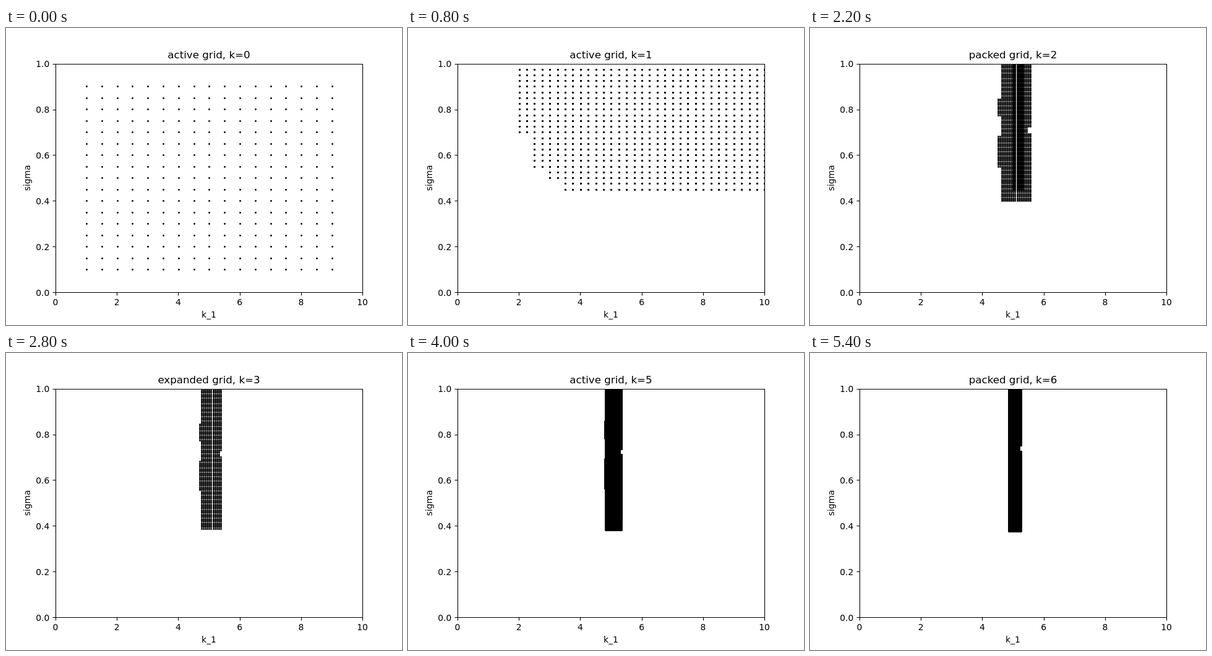
Write an HTML page with a canvas that moves like this. It is 640 px wide and 480 px high and loops after 5600 ms.

```html
<!DOCTYPE html>
<html lang="en">
<head>
<meta charset="utf-8">
<title>Grid refinement</title>
<style>
  html, body { margin: 0; width: 100%; height: 100%; overflow: hidden; background: #fff; }
  canvas, svg { position: absolute; left: 0; top: 0; display: block; }
  text { font: 13.89px "DejaVu Sans", sans-serif; fill: #000; }
  .mid { text-anchor: middle; }
  .end { text-anchor: end; }
  #title { font-size: 16.67px; }
  path { stroke: #000; stroke-width: 1.1; fill: none; }
</style>
</head>
<body>
<canvas id="dots" width="640" height="480"></canvas>
<svg id="axes" width="640" height="480">
  <path d="M80.5 58.5H576.5V427.5H80.5Z"/>
  <text id="title" class="mid" x="328" y="49"></text>
  <text class="mid" x="328" y="468">k_1</text>
  <text class="mid" transform="translate(39 242.4) rotate(-90)">sigma</text>
</svg>
<script>
const STEP = 200, COUNT = 28, EPS = 1e-6;
const STAGES = ['active', 'reduced', 'expanded', 'packed'];
const svg = document.getElementById('axes');
const title = document.getElementById('title');
const ctx = document.getElementById('dots').getContext('2d');

const toX = v => 80 + 49.6 * v;
const toY = v => 427.2 - 369.6 * v;

// Cell size of a level; sigma cells are a tenth as high.
const cell = level => 0.5 / 2 ** level;

// The accepted area narrows around k_1 = 5 as k grows.
function expanded(k, x, s) {
  if (k === 0) return x > 1 && x < 10 + EPS && s + EPS > 0.4 + 0.3 / (x - 1) ** 2;
  const shrink = 2 ** -k;
  const drift = s - 0.008 * (k - 2);
  const bulge = k > 1 && drift > 0.545 &&
    Math.cos(2 * Math.PI * (drift - 0.618) / 0.19) > 5 * (drift - 0.744);
  const dent = Math.abs(drift - 0.706) < 0.012;
  const left = 4.845 - Math.min(0.25, 0.9 * shrink) - (bulge ? cell(k) : 0);
  const right = 5.24 + 1.3 * shrink - (dent ? 0.07 : 0);
  return x > left && x < right && s > 0.3725 + 0.104 * shrink;
}

// Two cells in from the expanded edge, tapered towards the bottom.
function reduced(k, x, s) {
  const h = cell(k);
  const taper = k ? 3 * Math.max(0, 0.55 - s) ** 2 : 0;
  const reach = 2 * h + taper;
  const low = s - 0.2 * h;
  return s < 1 - 0.15 * h && expanded(k, x - reach, low) && expanded(k, x + reach, low);
}

const initial = (x, s) => x < 9 + EPS && s < 0.9 + EPS;

// Points plotted several times come out bolder.
const isBold = (k, x, s) => k === 0 || (x > 4.98 && x < 5.33 && s > 0.447);

// Grid indices along one axis, one for each distinct pixel.
function lines(from, to, step, place) {
  const found = new Map();
  for (let i = Math.round(from / step); i * step < to; i++) {
    const p = place(i * step);
    if (!found.has(p)) found.set(p, i);
  }
  return [...found];
}

function drawDots(level, isIn, packedFrom) {
  const h = cell(level), packed = packedFrom !== undefined;
  const xs = lines(1, 10 + EPS, h, v => Math.floor(toX(v) + 0.85));
  const ys = lines(0.1, 1 - EPS, h / 10, v => Math.floor(toY(v) + 0.3));
  const parent = i => packed ? i - i % 2 : i;
  ctx.clearRect(0, 0, 640, 480);
  for (const [py, j] of ys) for (const [px, i] of xs) {
    if (!isIn(parent(i) * h, parent(j) * h / 10)) continue;
    const repeats = packed && isBold(packedFrom, i * h, j * h / 10) ? 4 : 1;
    for (let n = 0; n < repeats; n++) {
      ctx.beginPath();
      ctx.arc(px + 0.5, py + 0.5, 1.39, 0, 2 * Math.PI);
      ctx.fill();
    }
  }
}

function show(index) {
  const k = Math.floor(index / 4), stage = STAGES[index % 4];
  const drawPacked = n => drawDots(n + 1, (x, s) => expanded(n, x, s), n);
  title.textContent = `${stage} grid, k=${k}`;
  if (index === 0) drawDots(0, initial);
  else if (stage === 'active') drawPacked(k - 1);
  else if (stage === 'packed') drawPacked(k);
  else if (stage === 'reduced') drawDots(k, (x, s) => reduced(k, x, s));
  else drawDots(k, (x, s) => expanded(k, x, s));
}

function label(x, y, cls, str) {
  svg.insertAdjacentHTML('beforeend', `<text class="${cls}" x="${x}" y="${y}">${str}</text>`);
}

for (let i = 0; i <= 5; i++) {
  const x = toX(2 * i), y = toY(i / 5);
  const px = Math.round(x) + 0.5, py = Math.round(y) + 0.5;
  svg.insertAdjacentHTML('beforeend', `<path d="M${px} 428V432.5M80 ${py}H75.5"/>`);
  label(x, 448, 'mid', 2 * i);
  label(70.3, Math.round(y + 5.3), 'end', (i / 5).toFixed(1));
}

ctx.beginPath();
ctx.rect(80, 58, 496, 370);
ctx.clip();

const begin = performance.now();
let current = -1;
function tick() {
  const index = Math.floor((performance.now() - begin) / STEP) % COUNT;
  if (index !== current) show(current = index);
  requestAnimationFrame(tick);
}
tick();
</script>
</body>
</html>
```
